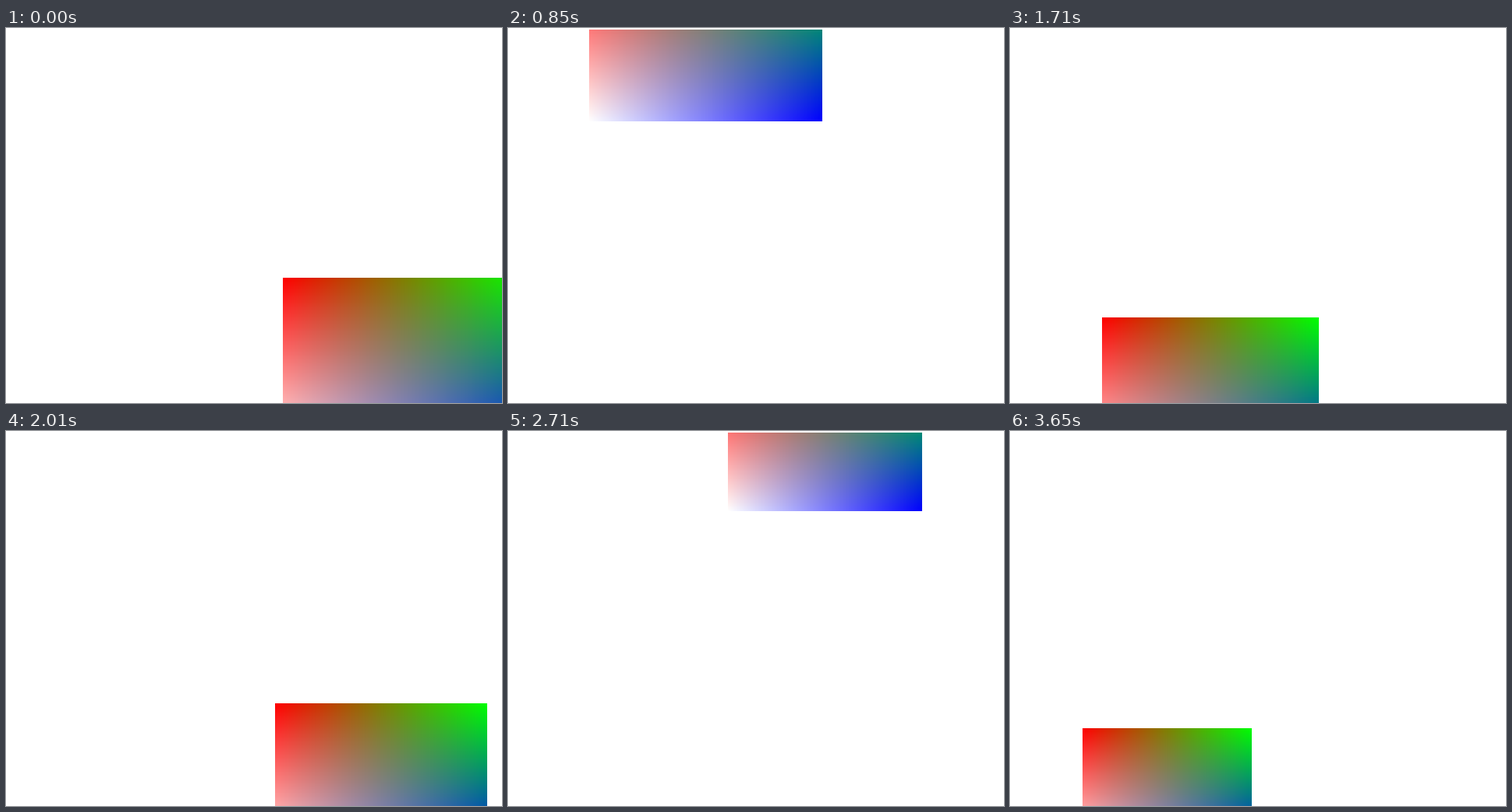
Write an HTML page with a canvas that moves like this. It is 636 px wide and 482 px high and loops after 3730 ms.

```html
<!DOCTYPE html>
<html lang="en">
<head>
<meta charset="utf-8">
<title>Orbiting gradient</title>
<style>
  html, body { margin: 0; width: 636px; height: 482px; overflow: hidden; background: #fff; }
  canvas { display: block; }
</style>
</head>
<body>
<canvas id="stage" width="636" height="482"></canvas>
<script>
const LOOP = 3730;
const CENTER = { x: 325, y: 242 };
const RADIUS = { x: 320, y: 240 };

// step, angle in degrees, card width
const KEYS = [
  [0, 54.6, 311], [11, -102.9, 299], [14, -146, 293.5], [21, -243.5, 280],
  [22, -257.7, 278], [28, -340.7, 265.3], [30, -369.2, 260], [35, -435.2, 249],
  [42, -532.8, 232], [43, -547.2, 229.3], [47, -607.3, 217]
];

// start time of every step
const starts = [0];
for (const base of [70, 610, 1170, 1710, 2250, 2790, 3330])
  for (const offset of [0, 80, 160, 240, 320, 390, 460])
    if (starts.length < 48) starts.push(base + offset);

const ctx = document.getElementById('stage').getContext('2d');
const mix = (a, b, t) => a + (b - a) * t;

// Four corner colours blended bilinearly
function makeCard(w, h) {
  const card = document.createElement('canvas');
  card.width = w;
  card.height = h;
  const c = card.getContext('2d');
  const img = c.createImageData(w, h);
  const [tl, tr, bl, br] = [[255, 0, 0], [0, 255, 0], [255, 255, 255], [0, 0, 255]];
  for (let y = 0, p = 0; y < h; y++) {
    const v = y / (h - 1);
    for (let x = 0; x < w; x++) {
      const u = x / (w - 1);
      for (let i = 0; i < 3; i++)
        img.data[p++] = mix(mix(tl[i], tr[i], u), mix(bl[i], br[i], u), v);
      img.data[p++] = 255;
    }
  }
  c.putImageData(img, 0, 0);
  return card;
}

const card = makeCard(320, 240);

function pose(step) {
  const i = Math.max(1, KEYS.findIndex(k => k[0] >= step));
  const [a, b] = [KEYS[i - 1], KEYS[i]];
  const t = (step - a[0]) / (b[0] - a[0]);
  const angle = mix(a[1], b[1], t) * Math.PI / 180;
  return {
    x: CENTER.x + RADIUS.x * Math.cos(angle),
    y: CENTER.y + RADIUS.y * Math.sin(angle),
    w: mix(a[2], b[2], t)
  };
}

function draw(step) {
  const { x, y, w } = pose(step);
  const h = w * 0.75;
  const left = Math.round(x - w / 2), right = Math.round(x + w / 2);
  const top = Math.round(y - h / 2), bottom = Math.round(y + h / 2);
  ctx.fillStyle = '#fff';
  ctx.fillRect(0, 0, 636, 482);
  ctx.drawImage(card, left, top, right - left, bottom - top);
  ctx.fillRect(0, 0, 6, 482);
  ctx.fillRect(0, 0, 636, 2);
}

let origin = null;
let shown = 0;

function tick() {
  const now = performance.now();
  if (origin === null) origin = now;
  const t = (now - origin) % LOOP;
  let step = starts.length - 1;
  while (starts[step] > t) step--;
  if (step !== shown) draw(shown = step);
  requestAnimationFrame(tick);
}

draw(0);
requestAnimationFrame(tick);
</script>
</body>
</html>
```
